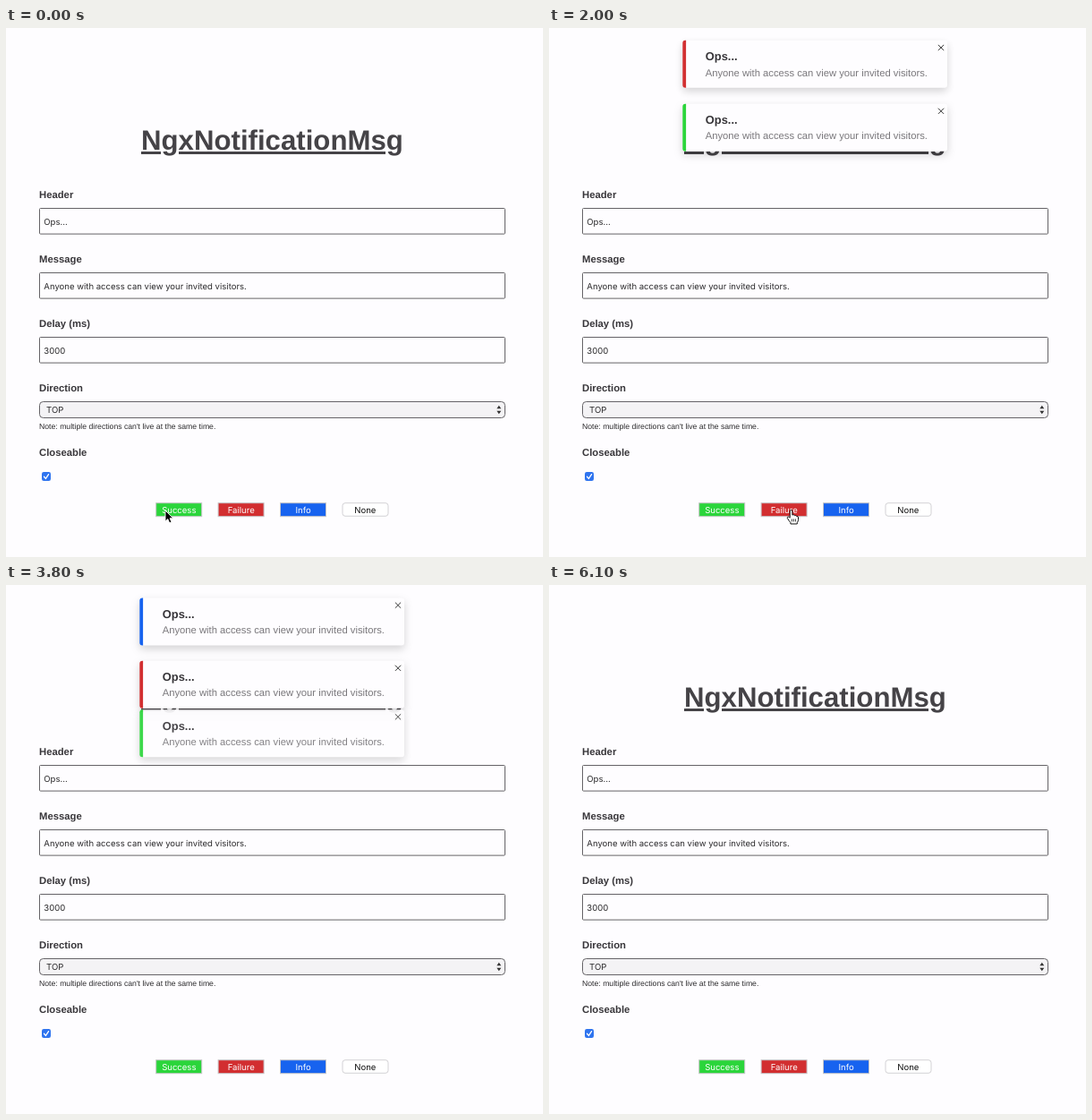
Animation of 600 by 591 pixels, one loop 6.3 s. Source, as an HTML page:

```html
<!DOCTYPE html>
<html lang="en">
<head>
<meta charset="utf-8">
<title>NgxNotificationMsg</title>
<style>
  html, body { margin: 0; width: 100%; height: 100%; overflow: hidden; background: #fefdff; }
  h1 {
    position: absolute; left: 151px; top: 108px; margin: 0;
    font: bold 31.2px/35px "Liberation Sans", Arial, sans-serif; color: #454347;
    white-space: nowrap; text-rendering: geometricPrecision;
    text-decoration: underline; text-decoration-thickness: 3px; text-underline-offset: 2px;
  }
  svg { position: absolute; left: 0; top: 0; display: block; text-rendering: geometricPrecision; }
  text { font-family: "Liberation Sans", Arial, sans-serif; }
  .label { font-size: 11.3px; font-weight: bold; fill: #39373b; }
  .value { font: 9.56px Inter, sans-serif; fill: #2b2a2c; }
  .note { font-size: 8.68px; fill: #2b2a2c; }
  .field { fill: #fefdff; stroke: #656367; }
  .btn { font: 9.56px Inter, sans-serif; text-anchor: middle; fill: #fff; }
  .face { fill: #fefdff; filter: drop-shadow(0 4px 5px rgba(0, 0, 0, .17)); }
  .head { font-size: 12.9px; font-weight: bold; fill: #363438; }
  .body { font-size: 11.25px; fill: #79777b; }
</style>
</head>
<body>
<h1>NgxNotificationMsg</h1>
<svg width="600" height="591" viewBox="0 0 600 591">
  <g id="form"></g>
  <rect x="37.5" y="417.5" width="520" height="18" rx="4" class="field" style="fill:#f4f3f5"/>
  <text x="45" y="429.7" class="value">TOP</text>
  <path d="M548.3 425.3L550.8 421.8L553.3 425.3zM548.3 427.7L550.8 431.2L553.3 427.7z" fill="#333"/>
  <text x="37" y="448" class="note">Note: multiple directions can't live at the same time.</text>
  <rect x="40" y="496" width="10" height="10" rx="2.2" fill="#2f74ef"/>
  <path d="M42.5 501.3L44.4 503.4L47.6 498.6" fill="none" stroke="#fff" stroke-width="1.3" stroke-linecap="round"/>
  <g id="buttons"></g>
  <g id="cards"></g>
  <path id="arrow" d="M0 0V12.2L2.8 9.6L4.7 14L7 13L5.1 8.8H8.8Z" fill="#000" stroke="#fff" stroke-width=".9"/>
  <g id="hand" stroke="#111" stroke-width="1" stroke-linejoin="round">
    <path fill="#fff" d="M-1.3 8.2V1Q-1.3 -.5 0 -.5T1.4 1V5Q3.3 4.3 3.8 5.6Q5.5 5 6 6.4Q8 6 8 8V10.5Q8 12 6.8 13.6V15H-.6V13.6Q-2.4 11.6 -4.2 8.6Q-4.4 7 -3 7.1Q-2.2 7.3 -1.3 8.2Z"/>
    <path fill="none" stroke-width=".8" d="M1 9.5V12.5M3 9.5V12.5M5 9.5V12.5"/>
  </g>
</svg>
<script>
const LOOP = 6300, STEP = 100, FADE = 400;
const CARD_H = 53, LEFT = 149.3, TOP = 14.5, PITCH = 70.2;
const MSG = "Anyone with access can view your invited visitors.";
const $ = id => document.getElementById(id);

// Form fields and buttons
const labels = ["Header", "Message", "Delay (ms)", "Direction", "Closeable"];
const values = ["Ops...", MSG, "3000"];
$("form").innerHTML = labels.map((s, i) =>
  `<text x="37" y="${190.3 + 72 * i}" class="label">${s}</text>`).join("") +
  values.map((s, i) =>
  `<rect x="37.5" y="${201.5 + 72 * i}" width="520" height="28.6" rx="1" class="field"/>
   <text x="42.3" y="${219.6 + 72 * i}" class="value">${s}</text>`).join("");

const GREEN = "#2bd53b", RED = "#d22e30", BLUE = "#1763ef";
$("buttons").innerHTML = [["Success", GREEN], ["Failure", RED], ["Info", BLUE]].map(([s, c], i) =>
  `<rect x="${167.7 + 69.4 * i}" y="530.7" width="51" height="15" fill="${c}" stroke="#c6c5c8"/>
   <text x="${193.3 + 69.4 * i}" y="541.6" class="btn">${s}</text>`).join("") +
  `<rect x="376" y="530.7" width="51" height="14.6" rx="3" fill="#fff" stroke="#d3d2d5"/>
   <text x="401.3" y="541.6" class="btn" style="fill:#111">None</text>`;

// Notifications, newest first
const cards = [
  { color: BLUE, enter: 2560, leave: 5670 },
  { color: RED, enter: 1660, leave: 4757 },
  { color: GREEN, enter: 660, leave: 3720 }
];
$("cards").innerHTML = cards.map(c =>
  `<g><rect width="295.7" height="${CARD_H}" rx="3" class="face"/>
   <path d="M3.8 0H3Q0 0 0 3V50Q0 53 3 53H3.8Z" fill="${c.color}"/>
   <text x="25.5" y="22.4" class="head">Ops...</text>
   <text x="25.4" y="39.8" class="body">${MSG}</text>
   <path d="M285.6 5L291.8 11.2M291.8 5L285.6 11.2" stroke="#333"/></g>`).join("");
cards.forEach((c, i) => c.el = $("cards").children[i]);

const clamp = x => Math.min(1, Math.max(0, x));

// CSS "ease": cubic-bezier(.25, .1, .25, 1)
function ease(x) {
  if (x <= 0 || x >= 1) return clamp(x);
  const curve = (a, b, u) => 3 * a * u * (1 - u) ** 2 + 3 * b * u * u * (1 - u) + u ** 3;
  let lo = 0, hi = 1;
  for (let i = 0; i < 24; i++) {
    const mid = (lo + hi) / 2;
    if (curve(.25, .25, mid) < x) lo = mid; else hi = mid;
  }
  return curve(.1, 1, lo);
}

const glide = (t, from, to) => {
  const p = clamp((t - from) / (to - from));
  return p * p * (3 - 2 * p);
};

function place(el, x, y, alpha) {
  el.setAttribute("transform", `translate(${x} ${y})`);
  el.setAttribute("opacity", alpha);
}

function draw(t) {
  cards.forEach((c, i) => {
    const p = ease((t - c.enter) / FADE), q = ease((t - c.leave) / FADE);
    const slot = cards.slice(0, i).filter(n => t >= n.enter).length;
    place(c.el, LEFT, TOP + slot * PITCH - CARD_H * (1 - p + q), p * (1 - q * q));
  });

  const x = 178 + 92.5 * glide(t, 1150, 1550) + 57.5 * glide(t, 2050, 2400);
  const overButton = (x - 167) % 69.4 < 52;
  const pointing = t >= 100 && overButton, shown = t < 3200;
  place($("hand"), x, 539, shown && pointing ? 1 : 0);
  place($("arrow"), x, 539, shown && !pointing ? 1 : 0);
}

function tick() {
  const t = performance.now() % LOOP;
  draw(Math.floor(t / STEP) * STEP);
  requestAnimationFrame(tick);
}
tick();
</script>
</body>
</html>
```
